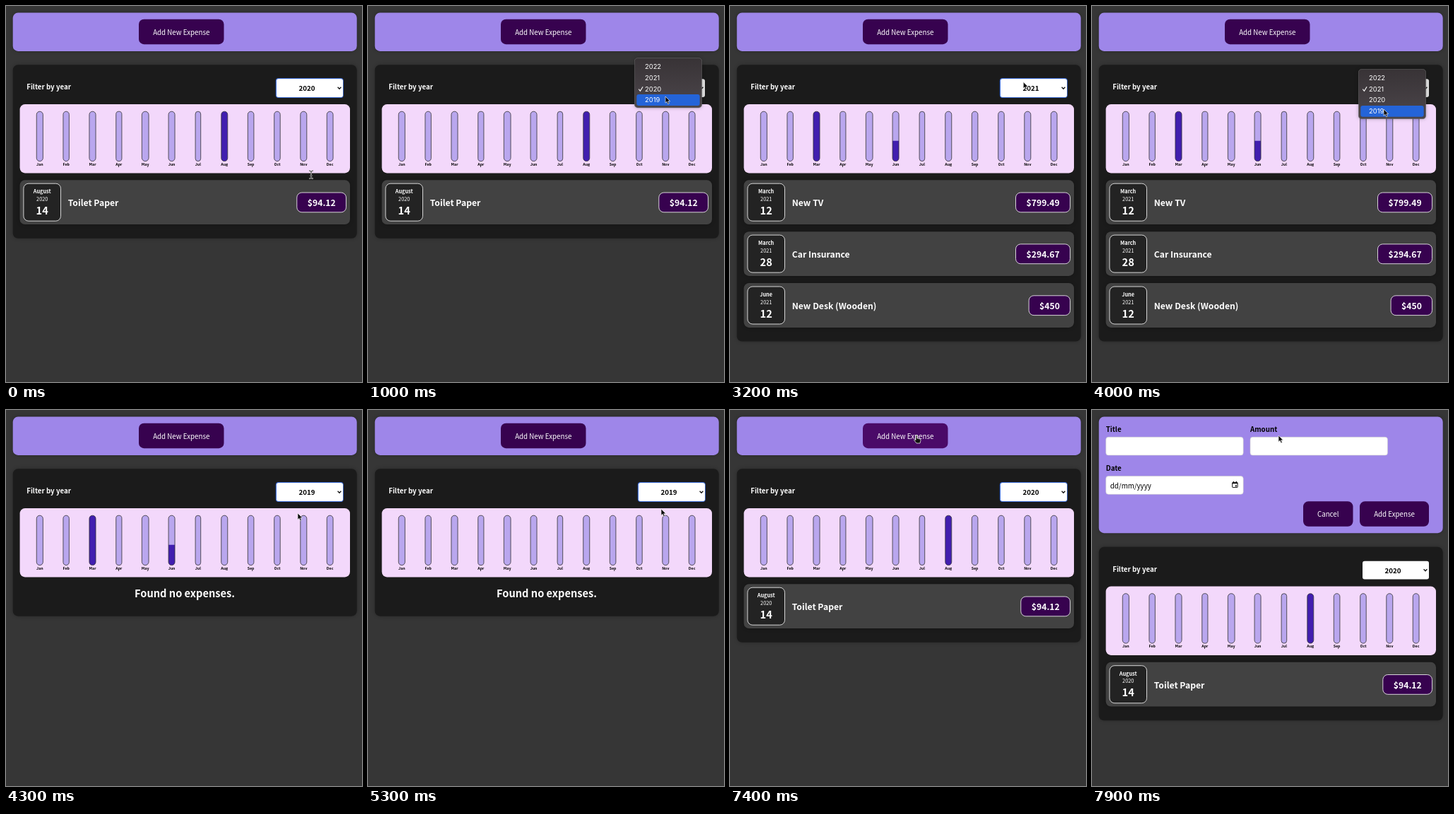
These frames come from a looping animation (504 px wide and 532 px high, 8000 ms). An HTML page:

```html
<!DOCTYPE html>
<html lang="en">
<head>
<meta charset="utf-8">
<title>Expenses</title>
<style>
html, body { margin: 0; width: 100%; height: 100%; overflow: hidden; background: #363636; }
svg { display: block; width: 504px; height: 532px; }
text { font: 9.74px "Noto Sans CJK JP", "Noto Sans CJK SC", "Noto Sans CJK", sans-serif; fill: #fff; white-space: pre; }
.b { font-weight: 700; }
.m { text-anchor: middle; }
.shadow { filter: drop-shadow(0 .6px 2.4px #0004); }
.menu text { font: 9.4px Inter, sans-serif; }
</style>
</head>
<body>
<svg id="stage" viewBox="0 0 504 532"></svg>
<script>
const LOOP = 8000, FORM_AT = 7600, FADE = 150, GROW = 300;
const YEARS = [2022, 2021, 2020, 2019], ROW = 15.8;
const MONTHS = 'Jan Feb Mar Apr May Jun Jul Aug Sep Oct Nov Dec'.split(' ');
const BAR_W = [9.1, 8.4, 9.1, 8.2, 9.7, 9, 7.6, 9, 8.6, 8.5, 9, 8.8];
const BARS = { 2019: {}, 2020: { Aug: 1 }, 2021: { Mar: 1, Jun: .411 } };
const ITEMS = {
  2019: [],
  2020: [['August', 14, 'Toilet Paper', '$94.12', 70]],
  2021: [['March', 12, 'New TV', '$799.49', 77.3], ['March', 28, 'Car Insurance', '$294.67', 77.3],
    ['June', 12, 'New Desk (Wooden)', '$450', 58.7]]
};
// menu opened, year changed, new year
const PICKS = [[600, 2200, 2021], [3400, 4300, 2019], [5500, 6800, 2020]];
// time, x, y of the pointer
const PATH = [[0, 432, 238], [100, 432, 238], [500, 424, 114], [650, 423, 115], [900, 421, 128], [1350, 421, 128],
  [1600, 417, 102], [1750, 417, 102], [1850, 416, 104], [3100, 416, 104], [3350, 414, 114], [3500, 414, 116],
  [3900, 413, 146], [5150, 413, 146], [5200, 415, 140], [5300, 415, 140], [5500, 416, 116], [5800, 416, 116],
  [6300, 416, 98], [6850, 416, 98], [7350, 264, 36], [8000, 264, 36]];

const stage = document.getElementById('stage');
const box = (x, y, w, h, r, fill, more = '') =>
  `<rect x="${x}" y="${y}" width="${w}" height="${h}" rx="${r}" fill="${fill}" ${more}/>`;
const text = (x, y, s, cls = '', style = '') => `<text x="${x}" y="${y}" class="${cls}" style="${style}">${s}</text>`;
const line = (d, color, w) => `<path d="${d}" fill="none" stroke="${color}" stroke-width="${w}"/>`;
const size = px => `font-size:${px}px`;
const EDGE = 'stroke="#fff" stroke-width=".8"';

function pointerAt(t) {
  const i = PATH.findIndex(p => p[0] > t), [t0, x0, y0] = PATH[i - 1], [t1, x1, y1] = PATH[i];
  const p = (t - t0) / (t1 - t0), k = p * p * (3 - 2 * p);
  return [x0 + (x1 - x0) * k, y0 + (y1 - y0) * k];
}

function button(x, y, w, label, hot) {
  return box(x, y, w, 35.5, 7.3, hot ? '#4a0a68' : '#37024f') + text(x + w / 2, y + 22, label, 'm');
}

function header(form, hot) {
  const panel = h => box(9.7, 9.5, 487, h, 7.3, '#9e86e9', 'class="shadow"');
  if (!form) return panel(54.5) + button(188, 18.7, 120.5, 'Add New Expense', hot);
  const field = (x, y, label) => text(x, y - 7.8, label, 'b', 'fill:#000') +
    box(x, y, 194.5, 25.7, 3.6, '#fff', 'stroke="#ccc" stroke-width=".6"');
  return panel(164.7) + field(19.7, 38.3, 'Title') + field(224, 38.3, 'Amount') + field(19.7, 93.6, 'Date') +
    text(25.8, 110.5, 'dd/mm/yyyy', '', 'fill:#000') +
    box(198.7, 102.4, 7.4, 7.2, .6, 'none', 'stroke="#111" stroke-width="1"') +
    line('M198.7 103.6h7.4M200.4 101v1.5M204.4 101v1.5', '#111', 1.3) + box(202.8, 106.4, 2, 2, 0, '#111') +
    button(299, 129.3, 70.5, 'Cancel') + button(379, 129.3, 98, 'Add Expense');
}

function chart(from, to, k) {
  return box(19.6, 139, 467.4, 97.4, 7.3, '#f3d8fb') + MONTHS.map((m, i) => {
    const w = BAR_W[i], cx = 47.8 + 37.35 * i, a = BARS[from][m] || 0, b = BARS[to][m] || 0;
    const bar = (fill, more) => box(cx - w / 2, 149.2, w, 70.4, w / 2, fill, more);
    const cut = 100 * (1 - a - (b - a) * k);
    return bar('#b9a6ee') + bar('#411eaf', `style="clip-path:inset(${cut}% 0 0 0)"`) +
      bar('none', 'stroke="#313131" stroke-width=".8"') +
      text(cx, 225.6, m, 'b m', size(5.3) + ';fill:#000');
  }).join('');
}

function item([month, day, title, price, w], i, year) {
  const y = 246.3 + 72.9 * i;
  return box(19.6, y, 467.4, 62.8, 7.3, '#424242', 'class="shadow"') +
    box(24.9, y + 4.9, 52.6, 53, 7, '#232323', EDGE) +
    text(51.2, y + 18.9, month, 'b m', size(7.3)) +
    text(51.2, y + 29.6, year, 'm', size(7.3)) +
    text(51.2, y + 48.6, day, 'b m', size(14.6)) +
    text(87.7, y + 36.8, title, 'b', size(12.2)) +
    box(481.8 - w, y + 17.7, w - .3, 27.8, 7, '#37024f', EDGE) +
    text(481.8 - w / 2, y + 36.8, price, 'b m', size(12.2));
}

function select(year, open, focus) {
  return (focus && !open ? box(381.8, 102, 96, 28, 4, '#3f6fd8') + box(383, 103.2, 93.6, 25.6, 3, '#dce6ff') : '') +
    box(383, 103.2, 94, 25.8, 3, open ? '#e4e4e4' : '#fff') +
    text(426, 120, year, 'b m', 'fill:#000') +
    line('M469.6 114.7l2.4 2.5l2.4 -2.5', '#111', 1.3);
}

function menu(year, y, alpha) {
  const picked = YEARS.indexOf(year), top = 106.7 - ROW * picked;
  const hover = Math.max(0, Math.min(3, Math.floor((y - top - 2.6) / ROW)));
  const rowY = i => top + 2.6 + ROW * i, tick = rowY(picked) + 8;
  return `<g class="menu" opacity="${alpha}">` +
    box(377.3, top - 1.5, 95.4, 70.3, 4.5, 'url(#glass)', 'stroke="#777" stroke-width=".5" class="shadow"') +
    box(380.3, rowY(hover), 89.4, ROW, 3, '#2464d8') +
    YEARS.map((n, i) => text(392, rowY(i) + 11.3, n)).join('') +
    line(`M383.3 ${tick + .4}l2.1 2.6l3.7 -6`, '#fff', 1.1) + '</g>';
}

function pointer(x, y, kind) {
  const shape = {
    beam: line('M-3 -5q3 0 3 2q0 -2 3 -2M0 -3v7M-3 6q3 0 3 -2q0 2 3 2M-1.5 2h3', '#ddd', 1.7) +
      line('M-3 -5q3 0 3 2q0 -2 3 -2M0 -3v7M-3 6q3 0 3 -2q0 2 3 2M-1.5 2h3', '#222', .8),
    hand: '<path d="M-1 0q1 -1 2 0v4l4 1q1.500 .5 1 2l-1 4h-5l-3.500 -4.500q0 -1.500 2.500 0z" fill="#111" stroke="#fff" stroke-width=".7"/>',
    arrow: '<path d="M0 0v9.200l2.100 -1.900l1.500 3.400l1.700 -.7l-1.500 -3.300h2.900z" fill="#080808" stroke="#eee" stroke-width=".7"/>'
  }[kind];
  return `<g transform="translate(${x} ${y})">${shape}</g>`;
}

function draw(t) {
  let year = 2020, prev = 2020, since = -LOOP, alpha = 0;
  for (const [open, change, next] of PICKS) {
    if (t >= change) [prev, year, since] = [year, next, change];
    else if (t >= open) alpha = Math.min(1, (change - t) / FADE);
  }
  const k = 1 - (1 - Math.min(1, (t - since) / GROW)) ** 1.8;
  const [x, y] = pointerAt(t), form = t >= FORM_AT, list = ITEMS[year];
  const hot = !form && x > 188 && x < 308 && y > 19 && y < 54;
  const height = list.length ? 172.6 + 72.9 * list.length : 208.4;
  stage.innerHTML = `<defs><linearGradient id="glass" x2="0" y2="1"><stop stop-color="#383336"/>
    <stop offset="1" stop-color="#4c464b"/></linearGradient></defs>` +
    header(form, hot) +
    `<g transform="translate(0 ${form ? 110.5 : 0})">` +
    box(9.7, 83.3, 487, height, 7.3, '#1b1b1b', 'class="shadow"') +
    text(29.2, 118, 'Filter by year', 'b') +
    select(year, alpha > 0, !form) + chart(prev, year, k) +
    (list.length ? list.map((e, i) => item(e, i, year)).join('')
      : text(253, 265.3, 'Found no expenses.', 'b m', size(14.6))) + '</g>' +
    (alpha ? menu(year, y, alpha) : '') +
    pointer(x, y, y > 236 ? 'beam' : hot ? 'hand' : 'arrow');
}

let start;
function tick(now) {
  start ??= now;
  draw((now - start) % LOOP);
  requestAnimationFrame(tick);
}
draw(0);
requestAnimationFrame(tick);
</script>
</body>
</html>
```
